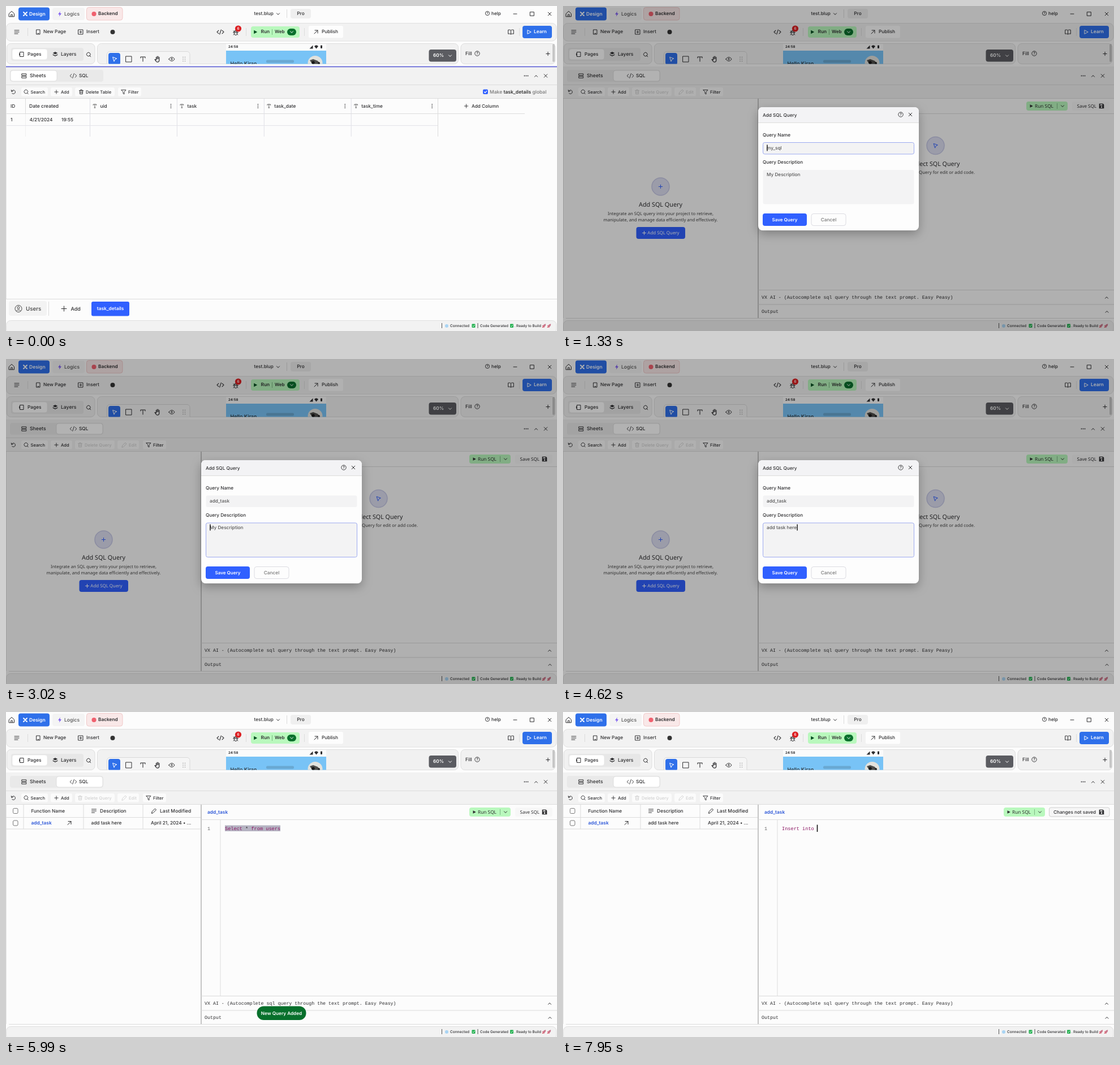
Recreate the animation shown at these times as an HTML page. Size 974x575 px, loop 7.99 s.

```html
<!DOCTYPE html>
<html lang="en">
<head>
<meta charset="utf-8">
<title>Add a query</title>
<style>
  html, body { margin: 0; width: 100%; height: 100%; overflow: hidden; background: #fcfcfc; }
  svg { display: block; width: 100vw; height: 100vh; }
  text { font-family: Inter, sans-serif; white-space: pre; text-rendering: geometricPrecision; }
  .noto { font-family: "Noto Sans", sans-serif; }
  .mono { font-family: "Liberation Mono", monospace; }
</style>
</head>
<body>
<svg id="stage" viewBox="0 0 974 575"></svg>
<script>
const INK = '#2e2e30', BLUE = '#2f70ea', VIVID = '#3060ff', GREY = '#f2f2f2', LINE = '#dcdcdc', MINT = '#b9f8bd';
const DURATION = 7990;

// Markup helpers; text and icons are placed by their vertical centre.
const rect = (x, y, x2, y2, fill, r = 0, stroke = 'none', extra = '') =>
  `<rect x="${x}" y="${y}" width="${x2 - x}" height="${y2 - y}" rx="${r}" fill="${fill}" stroke="${stroke}" ${extra}/>`;
const circle = (x, y, r, fill, stroke = 'none', w = 1) =>
  `<circle cx="${x}" cy="${y}" r="${r}" fill="${fill}" stroke="${stroke}" stroke-width="${w}"/>`;
const text = (x, y, str, { size = 8.3, fill = INK, weight = 500, font = '', anchor = 'start', id = '' } = {}) =>
  `<text ${id && `id="${id}"`} class="${font}" x="${x}" y="${y + size * 0.36}" font-size="${size}" font-weight="${weight}" fill="${fill}" text-anchor="${anchor}">${str}</text>`;
const icon = (x, y, d, color = INK, w = 1, fill = 'none') =>
  `<path transform="translate(${x} ${y})" d="${d}" fill="${fill}" stroke="${color}" stroke-width="${w}" stroke-linecap="round" stroke-linejoin="round"/>`;
const solid = (x, y, d, color = INK) => icon(x, y, d, 'none', 0, color);
const hline = (y, x = 0, x2 = 974, color = LINE) => rect(x, y, x2, y + 1, color);
const vline = (x, y, y2, color = LINE) => rect(x, y, x + 1, y2, color);
const group = (id, ...parts) => `<g id="${id}">${parts.join('')}</g>`;

const ICON = {
  plus: 'M-3.2 0H3.2M0-3.2V3.2',
  cross: 'M-2.8-2.8L2.8 2.8M2.8-2.8L-2.8 2.8',
  down: 'M-2.5-1.2L0 1.4L2.5-1.2',
  up: 'M-2.5 1.3L0-1.3L2.5 1.3',
  play: 'M-2.8-3.2L3.2 0L-2.8 3.2Z',
  arrow: 'M-3 3L3-3M-2-3H3V2',
  code: 'M-3-2.8L-6 0L-3 2.8M3-2.8L6 0L3 2.8M1.3-4L-1.3 4',
  search: 'M3.8 3.8L2 2A3.3 3.3 0 1 0-2.4 2A3.3 3.3 0 0 0 2 2',
  cursor: 'M-3-3.5L3.8-1L.7.5L-.8 3.8Z',
  trash: 'M-3.5-2.5H3.5M-1.3-2.5V-3.8H1.3V-2.5M-2.8-2.5L-2.3 3.8H2.3L2.8-2.5M-1-.8V2M1-.8V2',
  funnel: 'M-4-3.5H4L1 .2V4L-1 2.8V.2Z',
  pencil: 'M-4 4L-3.3 1L2-4L4-2L-1.2 3.3Z',
  box: 'M-4-4H4V4H-4Z',
  textT: 'M-4-2V-4H4V-2M0-4V4',
  smallT: 'M-2.8-1.5V-3H2.8V-1.5M0-3V3M-1 3H1',
  refresh: 'M-3-1A3.3 3.3 0 1 1-2.3 2.4M-3.6-3.4L-3.2-.8L-.7-1.4',
  sheets: 'M-3.8-3.6H3.8V-.6H-3.8ZM-3.8 .8H3.8V3.8H-3.8Z',
  page: 'M-3-4H3V4H-3ZM-1 2.5H1',
  floppy: 'M-4.3-4.3H2.6L4.3-2.6V4.3H-4.3ZM-2.5-3V-1H1.5V-3ZM0 .3A1.4 1.4 0 1 0 .01 .3Z'
};
const help = (x, y, color = INK, r = 4.2) => circle(x, y, r, 'none', color, .9) +
  text(x, y, '?', { size: r * 1.6, fill: color, weight: 600, anchor: 'middle' });
const dots = (x, y) => [-3, 0, 3].map(d => circle(x, y + d, .85, INK)).join('');
const check = x => rect(x - 3, 562.5, x + 3, 569, '#1faf4d', 1) + icon(x, 566, 'M-1.5 0L-.4 1.2L1.7-1.4', '#fff', .9);
const rocket = x => solid(x, 566, 'M3.2-3.4C0-3.4-1.5-1-2 1L-.5 2.2C2 1.5 3.4-.5 3.2-3.4Z', '#c9788c') +
  solid(x, 566, 'M-2.2 .8L-3.4 3.2L-.6 2.2ZM-1-1.5L-3.5-.2L-1.8 .2ZM1 1.2L0 3.4L-.5 2Z', '#d52f45');
const toolButton = (x, x2, d, label, labelX, color = INK) =>
  rect(x, 144, x2, 159.5, '#fbfbfb', 3) + icon(labelX - 8, 152, d, color, .9) +
  text(labelX, 152, label, { size: 7.6, fill: color });
const runButton = x => rect(x, 169, x + 73, 185, MINT, 4) + solid(x + 9, 177, 'M-2.5-2.8L2.8 0L-2.5 2.8Z') +
  text(x + 15, 177, 'Run SQL', { font: 'noto' }) + vline(x + 54, 172, 182, '#7fb985') + icon(x + 64, 177, ICON.down);

const topBar = group('topBar',
  icon(10, 14, 'M-4.5-.5L0-4.8L4.5-.5V4.8H-4.5ZM-1.3 4.5V1.2H1.3V4.5'),
  rect(22, 2.5, 77, 25.5, BLUE, 4), icon(34, 14, 'M-3-3L3 3M3-3L-3 3', '#fff', 1.8),
  text(41, 13.5, 'Design', { fill: '#fff', weight: 600, size: 8.5 }),
  rect(82, 3, 139, 25, '#f4f4f4', 4), solid(95, 14, 'M1-4.5L-3 .8H-.4L-1 4.5L3-1H.4Z', '#7d5cf0'),
  text(103, 13.5, 'Logics', { size: 8.6, fill: '#555' }),
  rect(142.5, 2.5, 206, 25, '#f9e8e8', 4, '#f0c9c9'), circle(155.5, 14, 4, '#f0606e'),
  text(163, 13.5, 'Backend', { weight: 600 }),
  text(438.5, 13.5, 'test.blup', { size: 8.2 }), icon(481, 14, ICON.down), vline(496, 6, 21),
  rect(503, 5, 539, 22, '#efefef', 4), text(521, 13.5, 'Pro', { anchor: 'middle' }),
  help(851, 13, INK, 3.6), text(858, 13, 'help', { size: 8.2 }),
  icon(900, 14, 'M-3 0H3'), icon(930, 14, 'M-3.3-3.3H3.3V3.3H-3.3Z'), icon(961, 14, ICON.cross));

const mainBar = group('mainBar',
  rect(.5, 30.5, 973, 62, GREY, 8, '#e0e0e0'),
  icon(19, 46, 'M-4-3H4M-4 0H4M-4 3H2'), vline(38, 39, 53),
  icon(57, 46, ICON.page), text(66, 45.5, 'New Page'),
  icon(132, 46, ICON.box + 'M-2 0H2M0-2V2'), text(142, 45.5, 'Insert'), circle(188.5, 46, 4, '#333'),
  icon(379, 46, ICON.code, INK, 1.1),
  icon(406, 47, 'M-2.5-2H2.5V2A2.5 2.5 0 0 1-2.5 2ZM-2-2A2 2 0 0 1 2-2M-4.5 0H4.5M-4-3L-2.5-1.5M4-3L2.5-1.5M-4 4L-2.3 2.5M4 4L2.3 2.5'),
  circle(410.5, 40, 5.6, '#dc2023'), text(410.5, 40, '6', { size: 6.5, fill: '#fff', anchor: 'middle' }),
  vline(424, 39, 53), rect(433, 36, 519, 56, MINT, 4), solid(441, 46, ICON.play, '#064d20'),
  text(450.5, 45.5, 'Run', { weight: 600 }), vline(470, 41, 51, '#79b880'), text(475, 45.5, 'Web', { weight: 600, size: 8 }),
  rect(497, 40, 513, 52, '#08702c', 6), icon(505, 46, ICON.down, '#fff'), vline(527, 39, 53),
  rect(535, 35, 596, 56.5, '#fdfdfd', 3), icon(548, 46, ICON.arrow), text(558, 45.5, 'Publish'),
  icon(892.5, 46, 'M0-3C-1-4-3-4-4.8-3.6V3.3C-3 3-1 3 0 4C1 3 3 3 4.8 3.3V-3.6C3-4 1-4 0-3V4'), vline(907, 39, 53),
  rect(913, 35, 965, 57, BLUE, 4), icon(925, 46, ICON.play, '#fff'), text(933, 45.5, 'Learn', { fill: '#fff', weight: 600 }));

const workArea = group('workArea',
  [[1.5, 157], [161.5, 799.5], [804, 971]].map(([x, x2]) => rect(x, 66.5, x2, 102.5, '#f1f1f1', 7, '#dedede')).join(''),
  rect(9, 74, 137, 97, '#e7e7e7', 4), rect(11, 76, 73, 95, '#fff', 4, '#e2e2e2', 'stroke-width=".6"'),
  icon(28, 85.5, 'M-3-4H3V4H-3ZM-4.3-1.5V1.5'), text(38, 85, 'Pages'),
  solid(87, 85, 'M0-4L4.3-1.8L0 .4L-4.3-1.8ZM-4.3 .3L0 2.5L4.3 .3V1.8L0 4L-4.3 1.8Z'), text(97, 85, 'Layers', { size: 8.6 }),
  icon(146, 86, ICON.search),
  `<g clip-path="url(#workClip)">`,
  rect(178.5, 80.5, 325, 112, '#f5f5f5', 5, '#d8d8d8'), rect(181, 83, 202, 104, BLUE, 4), icon(192, 94, ICON.cursor, '#fff'),
  icon(217, 94, 'M-5-5H5V5H-5Z'), icon(242, 94, ICON.textT, INK, 1.1),
  icon(268, 94, 'M-2.5 1V-3.5M-.8-.5V-5M1-.5V-4.8M2.8-.5V-3.5V1.5C2.8 6-1.5 6-3 3.5L-5 .5L-2.5 1.5', INK, 1.2),
  icon(293, 94, 'M-5 0C-2.5-4.5 2.5-4.5 5 0C2.5 4.5-2.5 4.5-5 0ZM0-1.3A1.3 1.3 0 1 0 .01-1.3Z'),
  [313, 316.5].map(x => [90.5, 94, 97.5].map(y => circle(x, y, .8, '#999')).join('')).join(''),
  rect(389, 67, 566, 103, '#78c3f6'), rect(389, 67, 566, 79, '#fbfbfb'),
  text(393, 72, '24:58', { size: 6, weight: 700 }),
  solid(539.5, 72.5, 'M-3 3L3-3V3Z'), solid(548.5, 72.5, 'M-3.5-1.2C-1.5-3-1.5-3 0-3S1.5-3 3.5-1.2L0 3Z'), rect(556, 69.5, 559, 75, INK, 1),
  text(396.5, 101.5, 'Hello Kiran', { size: 9, weight: 500, fill: '#222' }),
  rect(460, 95.5, 509, 100.5, '#69a8d2', 2),
  circle(546.5, 101, 13, '#e2e2dd'), solid(546, 97, 'M-9-1L-3-3L5 0L9 5V8H-3Z', '#4d4c49'), circle(543, 100, 2.7, '#171717'), circle(553, 101, 2, '#242424'),
  '</g>',
  rect(747.5, 77, 796, 98.5, '#5b5c61', 4), text(755, 87.5, '60%', { fill: '#fff', weight: 600 }), icon(785, 88, ICON.down, '#fff'),
  text(812, 84, 'Fill', { size: 8.6 }), help(833, 84), icon(958, 84.5, ICON.plus), rect(966, 67, 970, 99, '#c6c6c6', 2));

const dock = group('dock',
  rect(0, 107, 974, 163, '#f2f2f2'), hline(139), hline(163),
  rect(7, 113, 172, 134, '#e9e9e9', 4),
  rect(0, 114, 82, 133, '#fff', 4, '#d5d5d5', 'id="activeTab" stroke-width=".7"'),
  icon(32, 123.5, ICON.sheets), text(42, 123, 'Sheets', { size: 8.7 }),
  icon(119, 123.5, ICON.code, INK, .9), text(129, 123, 'SQL'),
  [-3, 0, 3].map(d => circle(919.5 + d, 123.5, .9, INK)).join(''), icon(937, 124, ICON.up), icon(954, 123.5, ICON.cross),
  icon(13, 152, ICON.refresh), toolButton(27, 74, ICON.search, 'Search', 43.5), toolButton(79, 117, ICON.plus, 'Add', 97));

const columns = ['uid', 'task', 'task_date', 'task_time'];
const sheetsView = group('sheetsView',
  rect(0, 106.5, 974, 108.3, '#686bd7', 0, 'none', 'id="resizeLine"'),
  toolButton(122, 192, ICON.trash, 'Delete Table', 141), toolButton(198, 239, ICON.funnel, 'Filter', 216),
  rect(843, 147.5, 852, 156, VIVID, 2), icon(847.5, 152, 'M-2 0L-.5 1.6L2.2-1.6', '#fff', 1.2),
  text(855, 151.5, 'Make <tspan font-weight="600" fill="#333">task_details</tspan> global', { size: 8.5, fill: '#777' }),
  hline(190, 0, 917), vline(0, 164, 518, '#e6e6e6'), vline(34, 164, 190), text(8, 177, 'ID'), text(41, 177, 'Date created', { size: 8.5 }),
  columns.map((name, i) => {
    const x = 148 + i * 153.9;
    return vline(x, 164, 231, '#dfdfe6') + icon(x + 9, 177, ICON.smallT, '#555', .9) + text(x + 18.5, 177, name) + dots(x + 143.5, 177);
  }).join(''),
  vline(763, 164, 231), icon(813.5, 177, ICON.plus, INK, .9), text(823, 177, 'Add Column', { size: 8.2 }),
  vline(34, 191, 231, '#efefef'), hline(211, 0, 763, '#e3e3e9'),
  text(8, 201, '1'), text(41.5, 201, '4/21/2024'), text(98, 201, '19:55', { size: 8.2 }),
  hline(518), rect(5, 522, 72, 548, '#f3f3f3', 4), circle(22, 535.5, 6, 'none', '#444'), circle(22, 533.8, 2, 'none', '#444'),
  icon(22, 535.5, 'M-4 4C-3 1.6 3 1.6 4 4', '#444'), text(35, 535.5, 'Users', { size: 9.8, fill: '#444' }), vline(75, 523, 548),
  icon(102.5, 535.5, 'M-4.5 0H4.5M0-4.5V4.5'), text(114.5, 536, 'Add', { size: 9 }),
  rect(151, 523, 218, 548.5, VIVID, 3), text(184.5, 535.5, 'task_details', { fill: '#fff', weight: 600, anchor: 'middle' }));

const noto = (size, fill = '#444', weight = 500) => ({ size, fill, weight, font: 'noto', anchor: 'middle' });
const sqlView = group('sqlView',
  toolButton(122, 192, ICON.trash, 'Delete Query', 139, '#d2d2d2'), toolButton(197, 235, ICON.pencil, 'Edit', 217, '#d2d2d2'),
  toolButton(242, 283, ICON.funnel, 'Filter', 260),
  vline(0, 164, 552, '#e6e6e6'), vline(344.5, 164, 552, '#8e8e8e'),
  hline(190, 345), hline(502, 345), hline(527.5, 345), hline(552, 5),
  text(351, 515.5, 'VX AI - (Autocomplete sql query through the text prompt. Easy Peasy)', { size: 8.31, font: 'mono' }),
  text(351, 540.5, 'Output', { size: 8.31, font: 'mono' }), icon(961, 516, ICON.up), icon(961.5, 541, ICON.up),
  group('savedBar', runButton(819), rect(900, 169, 966, 185, '#f7f7f7', 3), text(908.5, 177.5, 'Save SQL', { font: 'noto', size: 8 })),
  group('unsavedBar', runButton(779), rect(859.5, 169, 966, 185, '#f6f6f6', 3, '#cfcfcf'), text(867, 177, 'Changes not saved', { size: 8.2 })),
  `<path transform="translate(952 177)" d="${ICON.floppy}" fill="${INK}" fill-rule="evenodd"/>`,
  group('emptyList',
    circle(172.5, 319.5, 15.5, '#dedff2', '#c6c8e6', 1.5), icon(172.5, 319.5, ICON.plus, VIVID),
    text(172.5, 351.5, 'Add SQL Query', noto(10.8, INK)),
    text(172.5, 367, 'Integrate an SQL query into your project to retrieve,', noto(7.7)),
    text(172.5, 378.5, 'manipulate, and manage data efficiently and effectively.', noto(7.7)),
    rect(129.5, 391, 216, 412, VIVID, 4), icon(143.5, 401.5, 'M-3 0H3M0-3V3', '#fff'), text(177.5, 401, 'Add SQL Query', noto(7.9, '#fff'))),
  group('emptyEditor',
    circle(658.5, 247, 15.5, '#dedff2', '#c6c8e6', 1.5), icon(658.5, 247, ICON.cursor, VIVID),
    text(658.5, 279.5, 'Select SQL Query', noto(10.7, INK)),
    text(658.5, 294.5, 'Select SQL Query for edit or add code.', noto(7.8))),
  group('queryList',
    [31, 137, 242].map(x => vline(x - .5, 164, 207)).join(''), hline(186, 0, 344), hline(206.5, 0, 344),
    [175, 196.5].map(y => rect(12.5, y - 4.5, 21, y + 4.5, '#fff', 2, '#777')).join(''),
    text(44.5, 175.5, 'Function Name'), icon(155.5, 175, 'M-4-3H4M-4 0H4M-4 3H1'), text(166, 175, 'Description', { size: 8.5 }),
    icon(261.5, 175, ICON.pencil), text(272, 175, 'Last Modified', { size: 8.5 }),
    text(44.5, 196.5, 'add_task', { weight: 600, fill: '#2a55d8' }), icon(112, 196.5, ICON.arrow),
    text(150.5, 196.5, 'add task here'), text(256, 196.5, 'April 21, 2024 • ...')),
  group('editor',
    text(356, 177, 'add_task', { weight: 600, fill: '#2a55d8' }),
    vline(378.5, 191, 502), text(356, 205.5, '1', { size: 8.5, fill: '#666', font: 'mono' }),
    rect(387, 200.5, 485, 211, '#b5b3c2', 0, 'none', 'id="selection"'),
    text(387, 206, '', { size: 8.6, fill: '#8a1462', font: 'mono', id: 'code' }),
    rect(0, 199.5, 1.6, 212, '#111', 0, 'none', 'id="codeCaret"')));

const statusBar = group('statusBar',
  rect(.5, 556.5, 973, 580, GREY, 8, '#e0e0e0'), vline(770, 561, 570, '#555'), circle(779, 566, 3, '#a9d4f3'),
  text(785, 566, 'Connected', { size: 6.5 }), check(826.5), vline(833.5, 561, 570, '#555'),
  text(838, 566, 'Code Generated', { size: 6.4 }), check(894), text(898.5, 566, '. Ready to Build', { size: 6.4 }), rocket(951), rocket(960));

const toast = group('toast', rect(443.5, 520.5, 530.5, 545, '#08702c', 12),
  text(487, 533, 'New Query Added', { fill: '#fff', weight: 600, size: 8.2, anchor: 'middle' }));

const field = (id, y, y2, textY) =>
  rect(353.5, y, 620.5, y2, '#f3f3f4', 3, 'none', `id="${id}Box"`) + text(360, textY, '', { id, size: 8.2, fill: '#555' });
const dialog = group('dialog',
  rect(345, 179, 629, 397, '#fdfdfd', 8, 'none', 'filter="url(#shadow)"'),
  `<path d="M345 206V187Q345 179 353 179H621Q629 179 629 187V206Z" fill="#f3f3f5"/>`, hline(206, 345, 629),
  text(353, 193, 'Add SQL Query', { size: 8.2 }), help(597, 192), icon(614, 192, ICON.cross),
  text(353, 228.5, 'Query Name', { size: 8.2 }), field('name', 241.5, 262, 251.5),
  text(353, 276.5, 'Query Description', { size: 8.2 }), field('description', 290, 350.5, 298.5),
  rect(0, 0, 1.4, 11, '#111', 0, 'none', 'id="caret"'),
  rect(353, 367, 431, 389, VIVID, 4), text(392, 378, 'Save Query', { fill: '#fff', weight: 600, size: 8, anchor: 'middle' }),
  rect(439, 367.5, 500, 388.5, '#fdfdfd', 4, '#dcdce2'), text(469.5, 378, 'Cancel', { fill: '#777', anchor: 'middle' }));

const stage = document.getElementById('stage');
stage.innerHTML = `<defs>
    <clipPath id="workClip"><rect x="162" y="67" width="637" height="35.5"/></clipPath>
    <filter id="shadow" x="-20%" y="-20%" width="140%" height="145%"><feDropShadow dx="0" dy="6" stdDeviation="9" flood-opacity=".28"/></filter>
  </defs>` + rect(0, 0, 974, 575, '#fcfcfc') + topBar + mainBar + workArea + dock + sheetsView + sqlView + statusBar +
  rect(0, 0, 974, 575, '#000', 0, 'none', 'id="scrim"') + dialog + toast;

const el = {};
stage.querySelectorAll('[id]').forEach(node => el[node.id] = node);

const ramp = (t, start, length) => Math.min(1, Math.max(0, (t - start) / length));
const show = (node, visible) => node.setAttribute('visibility', visible ? 'inherit' : 'hidden');
const fade = (node, alpha) => { node.setAttribute('opacity', alpha); show(node, alpha > 0); };
const typed = (str, t, start, end) => t < start ? '' : str.slice(0, 1 + Math.floor(ramp(t, start, end - start) * (str.length - 1)));
const blink = (t, start) => (t - start) % 1000 < 500;

const NAME_FOCUS = 1200, DESCRIPTION_FOCUS = 2850, CODE_START = 6560, CODE_END = 7800;

function drawDialog(t) {
  const alpha = ramp(t, 860, 200) - ramp(t, 4950, 150);
  fade(el.dialog, alpha);
  el.scrim.setAttribute('opacity', alpha * .3);
  if (!alpha) return;

  const onName = t >= NAME_FOCUS && t < DESCRIPTION_FOCUS, onDescription = t >= DESCRIPTION_FOCUS;
  const name = typed('add_task', t, 1700, 2620), description = typed('add task here', t, 3300, 4480);
  el.name.textContent = name || 'my_sql';
  el.description.textContent = description || 'My Description';
  el.nameBox.setAttribute('stroke', onName ? '#9daaf0' : 'none');
  el.descriptionBox.setAttribute('stroke', onDescription ? '#9daaf0' : 'none');

  const typing = (t > 1700 && t < 2620) || (t > 3300 && t < 4700);
  const value = onName ? name : description;
  const width = value ? (onName ? el.name : el.description).getComputedTextLength() : 0;
  show(el.caret, (onName || onDescription) && (typing || blink(t, onName ? NAME_FOCUS : DESCRIPTION_FOCUS)));
  el.caret.setAttribute('x', 360.3 + width);
  el.caret.setAttribute('y', onName ? 245.5 : 292.5);
}

function drawEditor(t) {
  const saved = t >= 5150, open = t >= 5350, edited = t >= CODE_START;
  show(el.emptyList, !saved);
  show(el.queryList, saved);
  show(el.emptyEditor, !open);
  show(el.editor, open);
  show(el.savedBar, !edited);
  show(el.unsavedBar, edited);
  show(el.selection, open && t >= 5750 && !edited);
  const code = edited ? typed('Insert into ', t, CODE_START, CODE_END)
    : 'Select <tspan fill="#222">*</tspan> from users';
  if (el.code.innerHTML !== code) el.code.innerHTML = code;
  show(el.codeCaret, open && edited);
  el.codeCaret.setAttribute('x', 386.8 + code.length * 8.6 * .6);
}

function draw(t) {
  const sql = t >= 400;
  show(el.sheetsView, !sql);
  show(el.resizeLine, !sql && t < 160);
  fade(el.sqlView, sql ? 1 : 0);
  el.activeTab.setAttribute('x', sql ? 89 : 8);
  drawDialog(t);
  if (sql) drawEditor(t);
  fade(el.toast, ramp(t, 5150, 150) - ramp(t, 7000, 150));
}

const begin = performance.now();
(function tick() {
  draw((performance.now() - begin) % DURATION);
  requestAnimationFrame(tick);
})();
</script>
</body>
</html>
```
